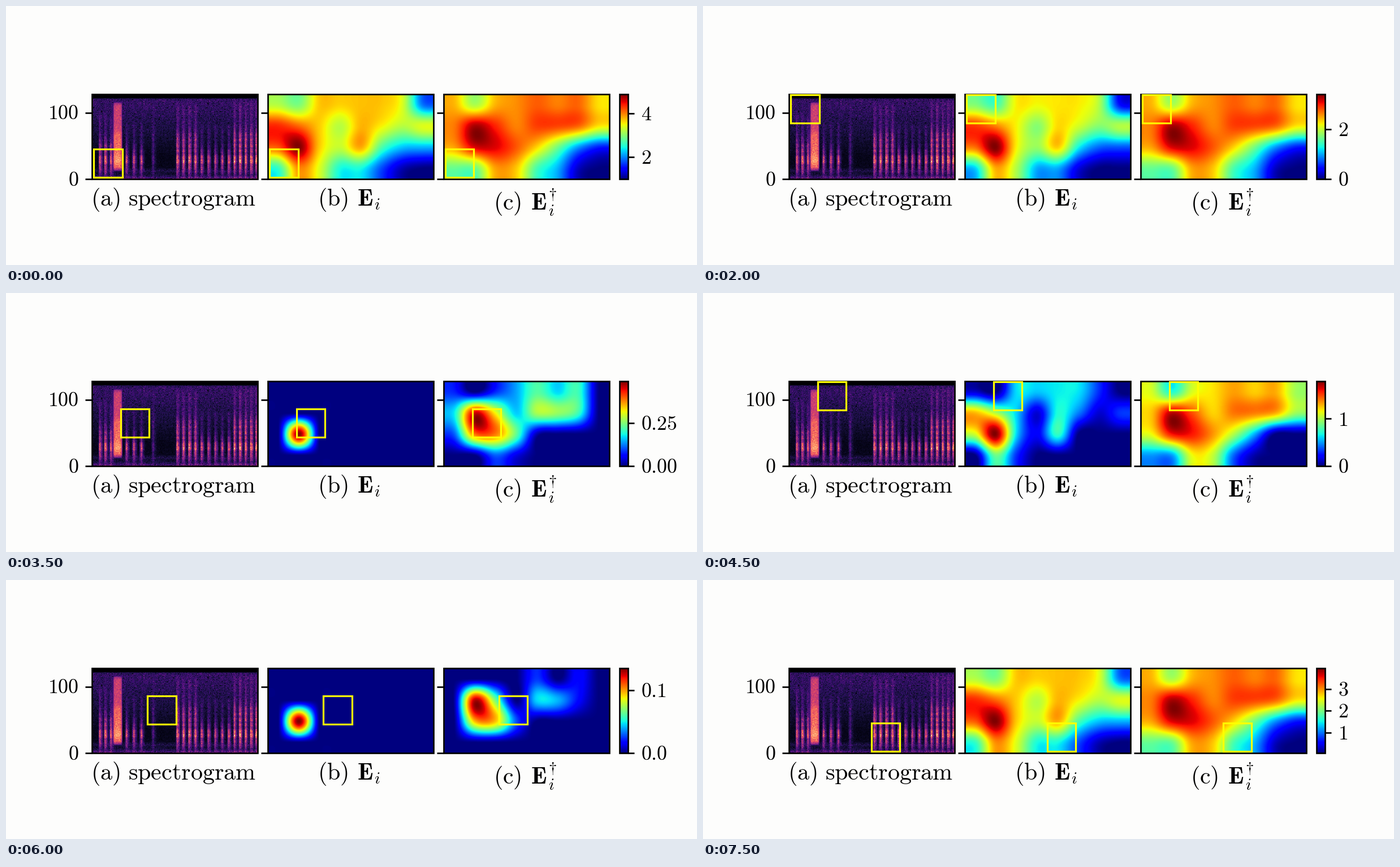
Animation, 1222 px wide and 458 px high, one loop 8 s. Source, as a matplotlib script:

```python
import numpy as np
import matplotlib.pyplot as plt
from matplotlib.animation import FuncAnimation
from matplotlib.patches import Rectangle
from matplotlib.ticker import MaxNLocator

W, H, DPI = 1222, 458, 100
TOP, BOTTOM, PANEL_W = 156, 306, 293
PANELS = 152.4 + 310.9 * np.arange(3)
BAR_X, BAR_W = 1085.4, 14.5
COLS, ROWS = 8, 4
LINE = 2.7 * 72 / DPI
plt.rcParams["mathtext.fontset"] = "cm"

fig = plt.figure(figsize=(W / DPI, H / DPI), dpi=DPI, facecolor="#fdfdfc")
ax = fig.add_axes([0, 0, 1, 1])
ax.axis("off")


def text(x, y, s, px, ha="left"):
    return ax.text(x, y, f"${s}$", size=px * 72 / DPI, ha=ha, va="baseline")


def line(xs, ys):
    return ax.plot(xs, ys, color="black", lw=LINE, solid_capstyle="butt")[0]


def frame(x, width):
    ax.add_patch(Rectangle((x, TOP), width, BOTTOM - TOP, fill=False,
                           ec="black", lw=LINE, zorder=3))


def image(data, x, width, cmap):
    return ax.imshow(data, extent=(x, x + width, BOTTOM, TOP), cmap=cmap,
                     vmin=0, vmax=1, aspect="auto", interpolation="nearest")


def rise(v, at, soft):
    """Smooth step from 0 to 1 around a position."""
    return 1 / (1 + np.exp(-(v - at) / soft))


def spectrogram():
    rng = np.random.default_rng(4)
    f = np.arange(128)[::-1, None]
    x = np.arange(250)[None, :] * PANEL_W / 250
    noise = rng.normal(size=(128, 250))
    base = 0.05 + 0.13 * np.clip((f - 35) / 80, 0, 1)
    base = base + 0.24 * np.exp(-f / 4) + 0.06 * np.exp(-((f - 12) / 3) ** 2)
    out = base * (1 + 0.28 * noise)
    # runs of clicks: first position, count, spacing, highest frequency
    runs = [(13, 3, 9.7, 72), (60, 3, 13, 58), (107, 1, 0, 90),
            (150, 4, 10.6, 85), (193, 5, 12, 55), (251, 5, 9.8, 90)]
    for start, count, gap, high in runs:
        amp = 0.3 if count == 1 else 0.4 + high / 160
        body = 0.42 * rise(-f, -high * 0.8, 5) * rise(f, 9, 3)
        body = body * (0.85 + 0.15 * np.cos(f * 0.75))
        peak = 0.28 * np.exp(-((f - 28) / 7) ** 2)
        tail = 0.12 * rise(-f, -high - 25, 3)
        for k in range(count):
            d = x - start - gap * k
            shape = np.exp(-(d / np.where(d < 0, 1.6, 4)) ** 2)
            out += amp * (body + peak + tail) * shape * (1 + 0.12 * noise)
    burst = 0.56 + 0.13 * rise(-f, -70, 3) + 0.1 * np.exp(-((f - 28) / 8) ** 2)
    burst = burst * rise(f, 13, 1.5) * rise(-f, -115, 1.5)
    gate = rise(x, 36.7, 0.8) * rise(-x, -52.3, 0.8)
    out = np.maximum(out, burst * gate * (1 + 0.08 * noise))
    return np.clip(out * rise(-f, -121, 0.5), 0, 1)


def field(base, corner, bumps):
    """Coarse grid: a level, a drop at the lower right, and round bumps."""
    r, c = np.mgrid[:ROWS, :COLS]
    depth, width, height = corner
    out = base - depth * np.exp(-((7 - c) / width) ** 2 - ((3 - r) / height) ** 3)
    for x, y, amp in bumps:
        out += amp * np.exp(-((c - x) ** 2 + (r - y) ** 2) / 0.55)
    return np.clip(out, 0, 1)


def weights(n, cells):
    """Cubic interpolation from cell centres to n pixels."""
    pos = (np.arange(n) + 0.5) * cells / n - 0.5
    out = np.zeros((n, cells))
    for k in range(-2, cells + 2):
        d = np.minimum(np.abs(pos - k), 2)
        near = 1.5 * d**3 - 2.5 * d**2 + 1
        far = -0.5 * d**3 + 2.5 * d**2 - 4 * d + 2
        out[:, np.clip(k, 0, cells - 1)] += np.where(d < 1, near, far)
    return out


WX, WY = weights(PANEL_W, COLS), weights(BOTTOM - TOP, ROWS)
E = field(0.71, (0.72, 3.5, 1.2), [
    (1, 2, .25), (.3, 1.4, .28), (.6, 0, -.28), (0, 3, -.31), (1, 3, .1),
    (4, 2, .22), (3, 1, -.14), (3, 3, -.14), (5.7, 1, -.14), (7, 0, -.47)])
E_DAGGER = field(0.76, (0.82, 2.5, 1.5), [
    (1, 1.45, .34), (2, 1.6, .18), (1, 0, -.2), (.5, 3, -.44), (3, 2.2, .1),
    (4.3, 1.4, .16), (5.6, 1.2, .16), (4, 3.2, -.14), (4, 0, .06),
    (6, 0, .06), (7, 0, -.09)])

# Peak response of each column of positions, at the bottom and half way up
SPAN = 3.89
START = (4.88, 2.56, 1.35, 3.95)
MIDDLE = (1.03, 0.493, 0.135, 0.5)


def heat(cells, cut):
    out = WY @ np.maximum(cells - max(cut, 0), 0) @ WX.T
    return out / out.max()


image(spectrogram(), PANELS[0], PANEL_W, "magma")
maps = [image(heat(c, 0), x, PANEL_W, "jet")
        for c, x in zip((E, E_DAGGER), PANELS[1:])]
image(np.linspace(1, 0, 150)[:, None], BAR_X, BAR_W, "jet")
frame(BAR_X, BAR_W)

for left in PANELS:
    frame(left, PANEL_W)
    for y in (188.5, BOTTOM):
        line([left - 12, left], [y, y])
text(128.5, 200.5, "100", 36, "right")
text(128.5, 318, "0", 36, "right")

text(150, 353, r"\mathrm{(a)\ spectrogram}", 42.1)
for x, y, letter in ((551, 353, "b"), (862, 360, "c")):
    text(x, y, rf"\mathrm{{({letter})}}", 42)
text(621, 353, r"\mathbf{E}", 42)
text(651, 360, "i", 29)
text(928, 360, r"\mathbf{E}", 42)
text(959, 341, r"\dagger", 29)
text(959, 371, "i", 29)

boxes = [ax.add_patch(Rectangle((0, 0), 50.4, 50.4, fill=False, ec="#ffff00",
                                lw=3.2 * 72 / DPI, zorder=4)) for _ in PANELS]
ticks = [(line([BAR_X + 15, BAR_X + 26], [0, 0]), text(1123, 0, "0", 36))
         for _ in range(4)]
locator = MaxNLocator(nbins=2, steps=[1, 2, 2.5, 5, 10])
ax.set_xlim(0, W)
ax.set_ylim(H, 0)


def update(step):
    col, row = divmod(step, 5)
    for box, left in zip(boxes, PANELS):
        box.set_xy((left + 2.9 + 47.5 * col, 252.7 - 24 * row))

    start = START[col]
    high = np.interp(row, [0, 2, 4], [start, MIDDLE[col], 0.7 * start])
    low = max(0, high - SPAN)
    maps[0].set_data(heat(E, 1 - high / SPAN))
    maps[1].set_data(heat(E_DAGGER, 0.83 * (1 - high / 2.7)))

    values = [v for v in locator.tick_values(low, high) if low <= v <= high]
    places = next(d for d in range(4) if np.allclose(values, np.round(values, d)))
    for i, (mark, label) in enumerate(ticks):
        shown = i < len(values)
        mark.set_visible(shown)
        label.set_visible(shown)
        if shown:
            y = BOTTOM - (values[i] - low) / (high - low) * (BOTTOM - TOP)
            mark.set_ydata([y, y])
            label.set_text(f"${values[i]:.{places}f}$")
            label.set_y(y + 12.3)
    return []


anim = FuncAnimation(fig, update, frames=16, interval=500, repeat=True,
                     repeat_delay=0, init_func=lambda: [])
plt.show()
```
